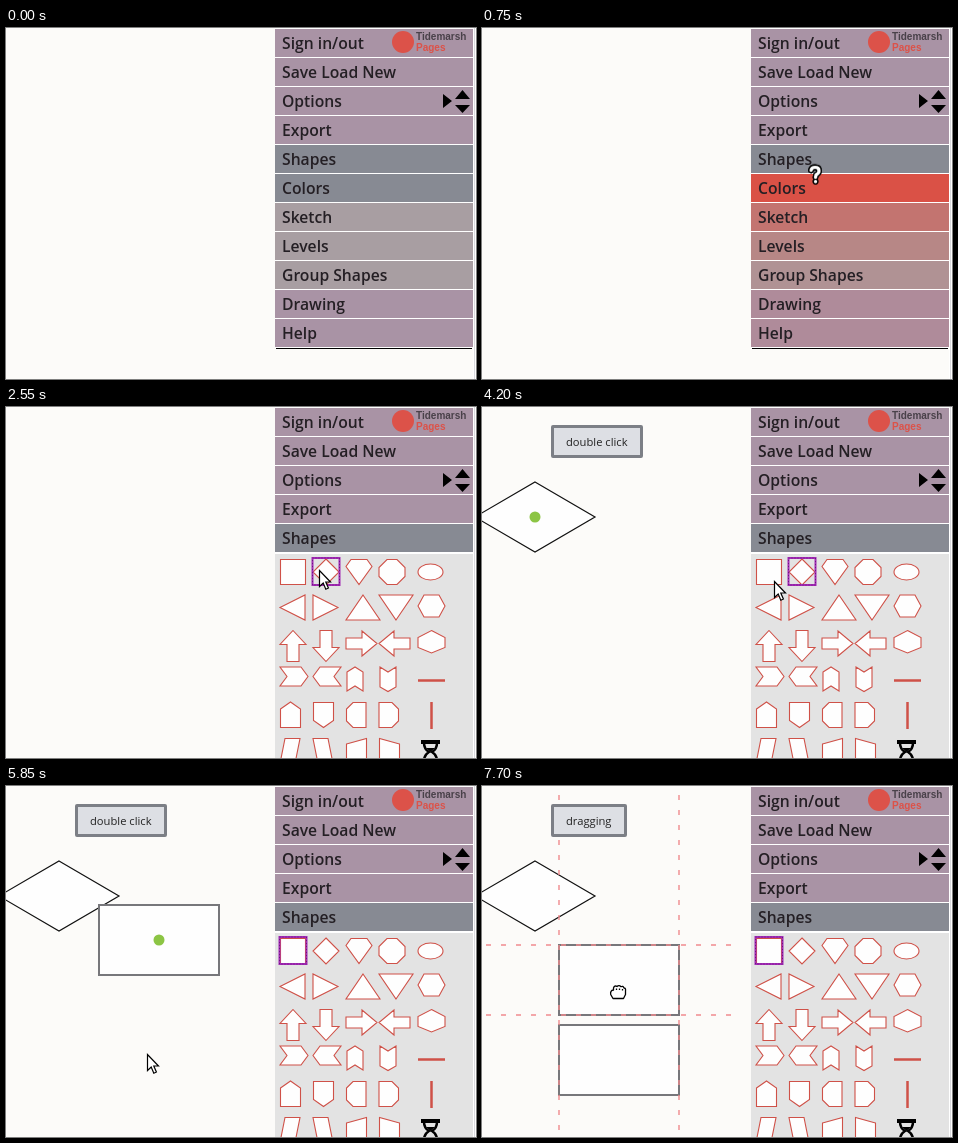
These frames come from a looping animation (470x351 px, 8000 ms). An HTML page:

```html
<!DOCTYPE html>
<html lang="en">
<head>
<meta charset="utf-8">
<title>Shape menu demo</title>
<style>
html, body { margin: 0; width: 100%; height: 100%; overflow: hidden; }
body { position: relative; background: #fcfbf9; font-family: "Open Sans", "Noto Sans", sans-serif; }
:root { --red: #da5146; }
.layer { position: absolute; left: 0; top: 0; width: 470px; height: 351px; }
.edge { position: absolute; left: 467px; top: 0; width: 3px; height: 351px; background: #fff; }
.edge::after { content: ""; position: absolute; left: 1px; width: 1px; height: 100%; background: #d9d9dd; }

/* menu */
.menu { position: absolute; left: 269px; top: 0; width: 198px; }
.row { --c: #a993a5; box-sizing: border-box; height: 29px; padding-left: 7px; border-top: 1px solid #fff;
  background: var(--c); color: #241f24; font-size: 15.7px; font-weight: 600; line-height: 28px; white-space: nowrap; }
.slate { --c: #878a93; }
.ash { --c: #a89ea2; }
.end { height: 1px; margin: 0 1px; border-top: 1px solid #fff; background: #000; }
.panel { height: 0; overflow: hidden; animation: slide 8s infinite; }
.panel svg { display: block; background: #e3e3e3; }
.pass { animation: pass 8s var(--at) infinite; }
.colors { animation: colors 8s infinite; }
.shapes { animation: shapes 8s infinite; }
@keyframes pass {
  0%, .6% { background: var(--red); animation-timing-function: ease; }
  6.9%, 100% { background: var(--c); }
}
@keyframes colors {
  0%, 7.99% { background: var(--c); }
  8%, 10% { background: var(--red); animation-timing-function: ease; }
  16.25%, 100% { background: var(--c); }
}
@keyframes shapes {
  0%, 9.99% { background: var(--c); }
  10%, 19.375% { background: var(--red); animation-timing-function: ease; }
  25.6%, 100% { background: var(--c); }
}
@keyframes slide {
  0%, 10.625% { height: 0; animation-timing-function: ease-in-out; }
  15%, 100% { height: 230px; }
}

/* brand */
.brand { position: absolute; left: 386px; top: 3px; width: 22px; height: 22px; border-radius: 50%; background: #dc5249; }
.name { position: absolute; left: 410px; top: 4px; font: bold 10px/10.5px "Liberation Sans", Arial, sans-serif; color: #494149; }
.name b { display: block; color: #dc5249; }

/* hard switches */
.pick, .dot, .diamond, .box1, .box2, .guides, .label, .ask, .arrow, .fist { opacity: 0; animation: 8s step-end infinite; }
.pick { animation-name: pick; }
.dot { animation-name: dot; }
.diamond { animation-name: diamond; }
.box1 { animation-name: box1; }
.box2 { animation-name: box2; }
.guides { animation-name: drag; }
.ask { animation-name: ask; }
.arrow { animation-name: arrow; }
.fist { animation-name: fist; }
@keyframes pick {
  28.125% { opacity: 1; transform: translate(33px, 0); }
  56.25% { opacity: 1; transform: none; }
}
@keyframes dot {
  40.625% { opacity: 1; transform: translate(53px, 110px); }
  64.375% { opacity: 1; transform: translate(153px, 154px); }
  76.875% { opacity: 1; transform: translate(137px, 274px); }
  88.125% { opacity: 0; }
}
@keyframes diamond { 41.875% { opacity: 1; } }
@keyframes box1 { 66.25% { opacity: 1; } }
@keyframes box2 { 80% { opacity: 1; } }
@keyframes drag { 88.125% { opacity: 1; } }
@keyframes ask { 5% { opacity: 1; } 20% { opacity: 0; } }
@keyframes arrow { 20% { opacity: 1; } 85% { opacity: 0; } }
@keyframes fist { 85% { opacity: 1; } }

/* action label */
.label { position: absolute; left: 69px; top: 18px; padding: 0 12px; border: 3px solid #7c7f86; border-radius: 2px;
  background: #dddfe4; color: #222; font-size: 11.2px; line-height: 27px; white-space: nowrap; }
.one { animation-name: one; }
.two { animation-name: two; }
.three { animation-name: drag; }
@keyframes one {
  40% { opacity: 1; } 41.875% { opacity: 0; }
  64.375% { opacity: 1; } 66.25% { opacity: 0; }
  76.25% { opacity: 1; } 78.75% { opacity: 0; }
}
@keyframes two {
  41.875% { opacity: 1; } 64.375% { opacity: 0; }
  66.25% { opacity: 1; } 76.25% { opacity: 0; }
  78.75% { opacity: 1; } 88.125% { opacity: 0; }
}

/* dragging */
.dx { animation: dx 8s linear infinite; }
.dy { animation: dy 8s linear infinite; }
@keyframes dx {
  0%, 88.125% { transform: none; }
  94.375%, 100% { transform: translate(-16px, 0); }
}
@keyframes dy {
  0%, 88.125% { transform: none; }
  94.375%, 96.24% { transform: translate(0, 35px); }
  96.25%, 100% { transform: translate(0, 40px); }
}

/* pointer */
.pointer { animation: move 8s linear infinite; }
@keyframes move {
  0%, 5% { transform: translate(333px, 275px); }
  8% { transform: translate(333px, 174px); }
  9.375% { transform: translate(333px, 157px); }
  10.6%, 19.375% { transform: translate(334px, 136px); }
  26.25%, 31.8% { transform: translate(320px, 172px); }
  31.875%, 32.5% { transform: translate(313px, 163px); }
  34.4% { transform: translate(220px, 181px); }
  38.125%, 47.5% { transform: translate(56px, 110px); }
  52.5%, 53.5% { transform: translate(292px, 174px); }
  54.375%, 58.75% { transform: translate(290px, 170px); }
  66.25%, 70.6% { transform: translate(153px, 152px); }
  71.25%, 73.1% { transform: translate(142px, 240px); }
  73.125%, 74.3% { transform: translate(141px, 268px); }
  74.375%, 82.5% { transform: translate(140px, 272px); }
  86.25%, 88.125% { transform: translate(152px, 166px); }
  94.375%, 96.24% { transform: translate(136px, 201px); }
  96.25%, 100% { transform: translate(136px, 206px); }
}
</style>
</head>
<body>
<svg class="layer" viewBox="0 0 470 351">
  <path class="diamond" d="M53 75L113 110L53 145L-7 110Z" fill="#fefefe" stroke="#111" stroke-width="1.2"/>
  <g fill="#fefefe" stroke="#77777b" stroke-width="2">
    <rect class="box2" x="77" y="239" width="120" height="70"/>
    <g class="dx"><g class="dy"><rect class="box1" x="93" y="119" width="120" height="70"/></g></g>
  </g>
  <circle class="dot" r="5.5" fill="#8cc544"/>
  <g class="guides" stroke="#f08a8e" stroke-width="1.4" stroke-dasharray="5 10">
    <path class="dx" d="M93 9V344M213 9V344"/>
    <path class="dy" d="M4 119H249M4 189H249"/>
  </g>
</svg>

<div class="edge"></div>
<div class="menu">
  <div class="row">Sign in/out</div>
  <div class="row">Save Load New</div>
  <div class="row">Options</div>
  <div class="row">Export</div>
  <div class="row slate shapes">Shapes</div>
  <div class="panel">
    <svg width="198" height="230" viewBox="269 145 198 230">
      <path d="M269 146H467" stroke="#fff" stroke-width="2"/>
      <g fill="#fefefe" stroke="#cf5148" stroke-width="1.1">
        <path d="M274.500 152.500h25v25h-25ZM320 152l13 13l-13 13l-13-13ZM345 152.500h16l5 7l-13 18l-13-18ZM381 152.500h10l8 8v9l-8 8h-10l-8-8v-9Z"/>
        <ellipse cx="424.500" cy="165" rx="12.500" ry="8"/>
        <path d="M274 200.500l25-12.500v25ZM332 200.500l-25-12.500v25ZM357 188l17 25h-34ZM390 213l17-25h-34ZM412 199l6-11h15l6 11l-6 11h-15Z"/>
        <path d="M287 223.500l13 14h-7v17h-12v-17h-7ZM320 254.500l13-14h-7v-17h-12v17h-7ZM340 231h16v-7l15 12.500l-15 12.500v-7h-16ZM404 231h-16v-7l-15 12.500l15 12.500v-7h16ZM425.500 223.500l13.500 7v10l-13.500 5.500l-13.500-5.500v-10Z"/>
        <path d="M274 260h21l7 9.500l-7 9.500h-21l7-9.500ZM335 260h-21l-7 9.500l7 9.500h21l-7-9.500ZM341 265l8-5l8 5v19l-8-5l-8 5ZM374 260l8 5l8-5v20l-8 4.500l-8-4.500Z"/>
        <path d="M274.500 302l10-7l10 7v18.500h-20ZM307.500 295.500h20v18l-10 7l-10-7ZM347 295.500h13v25h-13l-6.500-6.500v-12ZM386 295.500h-13v25h13l6.500-6.500v-12Z"/>
        <path d="M279 331.500h15l-5 25h-15ZM307 331.500h15l5 25h-15ZM340.500 337l20-5.500v25h-20ZM393.500 337l-20-5.500v25h20Z"/>
        <path d="M412 273.500h27M425.500 295v27" stroke-width="2.500"/>
      </g>
      <g fill="none" stroke="#000">
        <path d="M415 335h19M415 355h19" stroke-width="4"/>
        <path d="M418 336q0 6 5 9q-5 3-5 9M431 336q0 6-5 9q5 3 5 9" stroke-width="2.500"/>
      </g>
      <path d="M420 341h9l-4.500 4Z"/>
      <g class="pick" fill="none">
        <rect x="273.500" y="151" width="27" height="27" stroke="#a22bb4" stroke-width="2"/>
        <rect x="273.500" y="151" width="27" height="27" stroke="#6c1683" stroke-dasharray="1 2"/>
      </g>
    </svg>
  </div>
  <div class="row slate colors">Colors</div>
  <div class="row ash pass" style="--at:565ms">Sketch</div>
  <div class="row ash pass" style="--at:495ms">Levels</div>
  <div class="row ash pass" style="--at:425ms">Group Shapes</div>
  <div class="row pass" style="--at:405ms">Drawing</div>
  <div class="row pass" style="--at:400ms">Help</div>
  <div class="end"></div>
</div>
<div class="brand"></div>
<div class="name">Tidemarsh<b>Pages</b></div>

<div class="label one">click</div>
<div class="label two">double click</div>
<div class="label three">dragging</div>

<svg class="layer" viewBox="0 0 470 351">
  <path d="M437 66l9 7l-9 7ZM449 71l7.500-9l7.500 9ZM449 77h15l-7.500 8Z"/>
  <g class="pointer">
    <g class="ask" fill="none" stroke-linecap="round" stroke-linejoin="round">
      <path id="q" d="M-4-14.500Q-3.500-17.500 0-17.500Q4-17.500 4-14Q4-11.500 1-10L.5-7.500M.5-3.500v.3" stroke="#000" stroke-width="5.800"/>
      <use href="#q" style="stroke:#fff"/>
      <path d="M-4-14.500Q-3.500-17.500 0-17.500Q4-17.500 4-14Q4-11.500 1-10L.5-7.500M.5-3.500v.3" stroke="#fff" stroke-width="3.200"/>
    </g>
    <path class="arrow" d="M.5 .5V16.500L4.200 13L6.800 19.200L9.400 18L6.800 12H11.500Z" fill="#fff" stroke="#000" stroke-width="1.200"/>
    <g class="fist" stroke="#000" stroke-width="1.300" stroke-linejoin="round">
      <path d="M-5 6.500L-7.300 2.500Q-8-1.500-4.500-2V-4Q-3.500-7-1-5.500Q1-7.500 3-5.300Q5-6.500 6-4Q8-4 7.500-1V2.500L5.500 6.500Z" fill="#fff"/>
      <path d="M-1.500-3.500v1.500M1.500-3.500v1.500M4.500-3v1.500" fill="none"/>
    </g>
  </g>
</svg>
</body>
</html>
```
